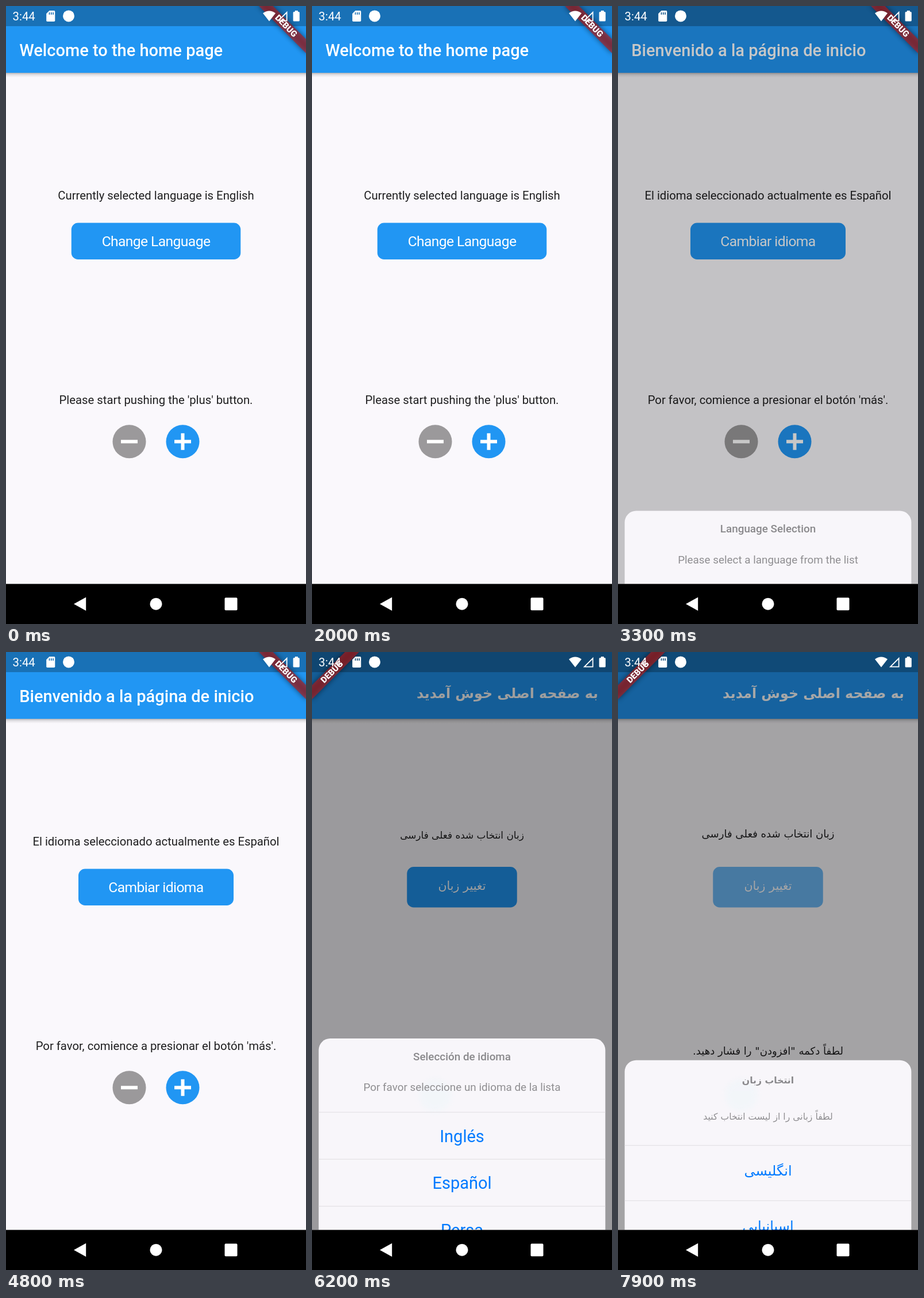
An HTML page that plays this animation: 522x1073 px, repeating every 8 s.

```html
<!DOCTYPE html>
<html lang="en">
<head>
<meta charset="utf-8">
<title>Language switch</title>
<style>
  html, body { margin: 0; width: 100%; height: 100%; overflow: hidden; background: #000; }
  svg { display: block; width: 522px; height: 1073px; }
  text { font-family: Roboto, sans-serif; white-space: pre; }
  .fa text { font-family: "DejaVu Sans", sans-serif; direction: rtl; }
  .mid { text-anchor: middle; }
</style>
</head>
<body>
<svg id="stage" viewBox="0 0 522 1073" xmlns="http://www.w3.org/2000/svg">
  <defs>
    <linearGradient id="barShadow" x1="0" y1="0" x2="0" y2="1">
      <stop offset="0" stop-color="#000" stop-opacity=".28"/>
      <stop offset=".4" stop-color="#000" stop-opacity=".1"/>
      <stop offset="1" stop-color="#000" stop-opacity="0"/>
    </linearGradient>
    <filter id="soft" x="-30%" y="-120%" width="160%" height="340%">
      <feGaussianBlur stdDeviation="5"/>
    </filter>
  </defs>
  <rect width="522" height="1073" fill="#faf8fc"/>
  <rect y="116" width="522" height="8" fill="url(#barShadow)"/>
  <rect y="35" width="522" height="81" fill="#2196f3"/>
  <rect width="522" height="35" fill="#1971b6"/>
  <g id="pages"></g>
  <rect id="dim" width="522" height="1003.5"/>
  <g id="sheets"></g>
  <g id="banner">
    <rect x="-58" y="40.6" width="116" height="17.4" fill="#000" opacity=".5" filter="url(#soft)"/>
    <rect x="-58" y="40.6" width="116" height="17.4" fill="#b71c1c" fill-opacity=".627"/>
    <text class="mid" y="53.8" font-size="14.8" font-weight="900" fill="#fff">DEBUG</text>
  </g>
  <g id="status" fill="#fff">
    <text x="11.6" y="25" font-size="20.3">3:44</text>
    <path d="M75.5 8H83.5Q85.3 8 85.3 9.8V25.2Q85.3 27 83.5 27H72Q70.2 27 70.2 25.2V13.3Z"/>
    <path d="M75.5 11v4M78.8 11v4M82.1 11v4" stroke="#1971b6" stroke-width="1.6" id="slots"/>
    <circle cx="109" cy="17.4" r="10"/>
    <path d="M447 12.6Q458 4.4 469 12.6L458 26.6Z"/>
    <path d="M488.6 11V25.6H474Z" fill="none" stroke="#fff" stroke-width="1.8"/>
    <path d="M502.8 10V8H507.8V10H509.2Q510.8 10 510.8 11.6V25Q510.8 26.6 509.2 26.6H501.2Q499.6 26.6 499.6 25V11.6Q499.6 10 501.2 10Z"/>
  </g>
  <rect y="1003.4" width="522" height="70" fill="#000"/>
  <g fill="#fff">
    <path d="M118 1038.2L139.2 1026.4V1050Z"/>
    <circle cx="261" cy="1038.2" r="10.5"/>
    <rect x="380.5" y="1027.2" width="22" height="22" rx="1.8"/>
  </g>
</svg>
<script>
const LOOP = 8000;
const SLIDE = 335;
const FLOOR = 1003.4;
const EDGE = 11.6;
const BLUE = '#2196f3';
const $ = id => document.getElementById(id);

const latin = {
  title: 29, titleX: 23.2, titleY: 87, body: 20.3, bodyY: 335.8, hintY: 691,
  label: 24.65, spacing: -0.594, labelY: 417, top: 376.5, tall: 63.5,
  minus: 214.5, plus: 307.5, iconY: 756.3,
  head: 128, row: 81.6, small: 18.85, big: 29, headY: 37.5, noteY: 91, rowY: 51.5
};
const persian = {
  title: 23.7, titleX: 498, titleY: 80, body: 18.1, bodyY: 322, hintY: 699,
  label: 20.6, spacing: 0, labelY: 413, top: 373, tall: 70.5,
  minus: 307.5, plus: 214.5, iconY: 770,
  head: 148, row: 96, small: 15.7, big: 24, headY: 40, noteY: 103, rowY: 52
};

const langs = {
  en: { ...latin, wide: 294.5,
    page: ['Welcome to the home page', 'Currently selected language is English',
      'Change Language', "Please start pushing the 'plus' button."],
    sheet: ['Language Selection', 'Please select a language from the list',
      'English', 'Spanish', 'Persian', 'Cancel'] },
  es: { ...latin, wide: 270,
    page: ['Bienvenido a la página de inicio', 'El idioma seleccionado actualmente es Español',
      'Cambiar idioma', "Por favor, comience a presionar el botón 'más'."],
    sheet: ['Selección de idioma', 'Por favor seleccione un idioma de la lista',
      'Inglés', 'Español', 'Persa', 'Cancelar'] },
  fa: { ...persian, wide: 191.5,
    page: ['به صفحه اصلی خوش آمدید', 'زبان انتخاب شده فعلی فارسی',
      'تغییر زبان', 'لطفاً دکمه "افزودن" را فشار دهید.'],
    sheet: ['انتخاب زبان', 'لطفاً زبانی را از لیست انتخاب کنید',
      'انگلیسی', 'اسپانیایی', 'فارسی', 'لغو'] }
};

const visits = [
  { lang: 'en', open: 2040, close: 3197.5 },
  { lang: 'es', open: 4841.5, close: 6162 },
  { lang: 'fa', open: 7831.5, close: Infinity }
];

const clamp = x => Math.min(1, Math.max(0, x));
const mix = (a, b, k) => a + (b - a) * k;

function bezier(x1, y1, x2, y2) {
  const at = (a, b, s) => 3 * (1 - s) ** 2 * s * a + 3 * (1 - s) * s * s * b + s ** 3;
  return x => {
    if (x <= 0 || x >= 1) return clamp(x);
    let lo = 0, hi = 1;
    for (let i = 0; i < 24; i++) {
      const s = (lo + hi) / 2;
      if (at(x1, x2, s) < x) lo = s; else hi = s;
    }
    return at(y1, y2, lo);
  };
}
const glide = bezier(0.35, 0.91, 0.33, 0.97);

const centred = (s, y, size, fill, more = '') =>
  `<text class="mid" x="261" y="${y}" font-size="${size}" fill="${fill}" ${more}>${s}</text>`;

const bar = (x, y, w, h) =>
  `<rect x="${x - w / 2}" y="${y - h / 2}" width="${w}" height="${h}" fill="#fff"/>`;

function pageMarkup(key) {
  const p = langs[key], [title, current, label, hint] = p.page;
  const weight = key === 'fa' ? 700 : 500;
  return `<g id="page-${key}" class="${key}">
    <text x="${p.titleX}" y="${p.titleY}" font-size="${p.title}" font-weight="${weight}" fill="#fff">${title}</text>
    <g class="body">${centred(current, p.bodyY, p.body, '#1f1f20')}</g>
    <g class="button">
      <rect x="${261 - p.wide / 2}" y="${p.top}" width="${p.wide}" height="${p.tall}" rx="11.6" fill="${BLUE}"/>
      ${centred(label, p.labelY, p.label, '#fff', `letter-spacing="${p.spacing}"`)}
    </g>
    <g class="body">${centred(hint, p.hintY, p.body, '#1f1f20')}</g>
    <circle cx="${p.minus}" cy="${p.iconY}" r="29" fill="#9b999b"/>
    ${bar(p.minus, p.iconY, 29, 6)}
    <circle cx="${p.plus}" cy="${p.iconY}" r="29" fill="${BLUE}"/>
    ${bar(p.plus, p.iconY, 29, 6)}${bar(p.plus, p.iconY, 6, 29)}
  </g>`;
}

function sheetMarkup(key) {
  const p = langs[key], [head, note, ...rows] = p.sheet;
  const cancel = rows.pop();
  const high = p.head + 3 * p.row;
  const weight = key === 'fa' ? 700 : 500;
  const panel = (y, h, fill) =>
    `<rect x="${EDGE}" y="${y}" width="498.8" height="${h}" rx="20" fill="${fill}"/>`;
  const choices = rows.map((s, i) => {
    const y = p.head + i * p.row;
    return `<rect x="${EDGE}" y="${y - 0.5}" width="498.8" height="1" fill="#dfdde1"/>`
      + centred(s, y + p.rowY, p.big, '#007aff');
  }).join('');
  return `<g id="sheet-${key}" class="${key}">
    <clipPath id="clip-${key}">${panel(0, high, '#fff')}</clipPath>
    ${panel(0, high, '#f8f6fa')}
    <g clip-path="url(#clip-${key})"><circle class="glow" cx="${p.plus}" r="28" fill="#eaf6f9" opacity=".4" filter="url(#soft)"/></g>
    ${centred(head, p.headY, p.small, '#8a898c', `font-weight="${weight}"`)}
    ${centred(note, p.noteY, p.small, '#8f8e91')}
    ${choices}
    ${panel(high + EDGE, p.row, '#fdfdfe')}
    ${centred(cancel, high + EDGE + p.rowY, p.big, '#007aff', `font-weight="${weight}"`)}
  </g>`;
}

const keys = Object.keys(langs);
$('pages').innerHTML = keys.map(pageMarkup).join('');
$('sheets').innerHTML = keys.map(sheetMarkup).join('');

const show = (el, on) => el.setAttribute('display', on ? 'inline' : 'none');

function lift(v, t) {
  return t < v.close
    ? glide((t - v.open) / SLIDE)
    : 1 - glide((t - v.close) / SLIDE);
}

// A tap fades the button quickly, then it recovers.
function pressed(t) {
  const v = visits.find(v => t > v.open - 30 && t < v.open + 165);
  if (!v) return 1;
  const d = t - v.open;
  return d < 0 ? mix(1, 0.4, (d + 30) / 30) : mix(0.4, 1, d / 165);
}

function draw(t) {
  const now = t < visits[0].close ? 'en' : t < visits[1].close ? 'es' : 'fa';
  const page = langs[now];
  let shade = 0;

  keys.forEach(k => show($('page-' + k), k === now));
  document.querySelectorAll('.button').forEach(b => b.setAttribute('opacity', pressed(t)));

  // Persian body type settles into its larger size.
  const grow = clamp((t - 6200) / 160);
  document.querySelectorAll('#page-fa .body text').forEach((el, i) => {
    el.setAttribute('font-size', persian.body * mix(14 / 15, 1, grow));
    el.setAttribute('y', (i ? persian.hintY : persian.bodyY) + mix(2, 0, grow));
  });

  visits.forEach(v => {
    const up = lift(v, t), el = $('sheet-' + v.lang), p = langs[v.lang];
    show(el, up > 0);
    if (up <= 0) return;
    const height = p.head + 4 * p.row + 2 * EDGE;
    const top = FLOOR - height * up;
    el.setAttribute('transform', `translate(0 ${top})`);
    const glow = el.querySelector('.glow');
    glow.setAttribute('cx', page.plus);
    glow.setAttribute('cy', page.iconY - top);
    shade = 0.4 * (1 - (1 - up) ** 2.6);
  });
  $('dim').setAttribute('opacity', shade);
  const dark = 1 - shade;
  $('slots').setAttribute('stroke', `rgb(${25 * dark},${113 * dark},${182 * dark})`);
  $('banner').setAttribute('transform', now === 'fa' ? 'rotate(-45)' : 'translate(522 0) rotate(45)');
}

const start = performance.now();
function tick() {
  draw((performance.now() - start) % LOOP);
  requestAnimationFrame(tick);
}
draw(0);
requestAnimationFrame(tick);
</script>
</body>
</html>
```
